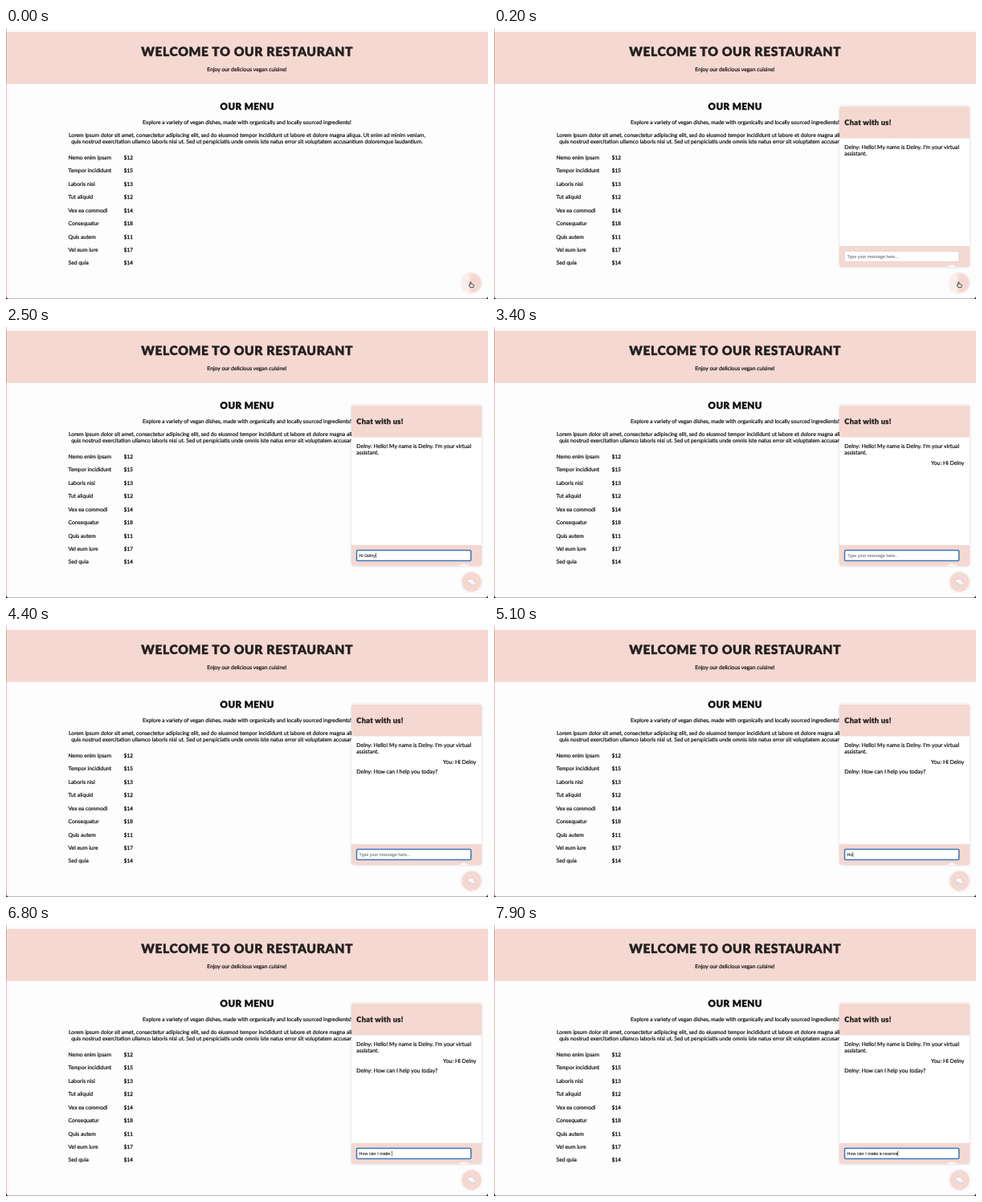
These frames come from a looping animation (600 by 338 pixels, 8 s). An HTML page:

```html
<!DOCTYPE html>
<html lang="en">
<head>
<meta charset="utf-8">
<title>Restaurant chat</title>
<style>
  html, body { margin: 0; width: 100%; height: 100%; overflow: hidden; background: #fefdfd; }
  svg { display: block; width: 100%; height: 100%; }
  text { font: 6.8px Lato, "Open Sans", sans-serif; fill: #111; stroke: #111; stroke-width: .2px;
         white-space: pre; text-rendering: geometricPrecision; }
  .title { font-weight: 900; fill: #231f1e; stroke: #231f1e; stroke-width: .4px; letter-spacing: .035em; }
  .mid { text-anchor: middle; }
  .end { text-anchor: end; }
  .chat text { font-size: 6.9px; }
  .price { font-size: 6.4px; stroke-width: .3px; }
  .chat #entry { font: 5.42px "Liberation Sans", Arial, sans-serif; stroke-width: .08px; }
  .pink { fill: #f4d8d1; }
</style>
</head>
<body>
<svg viewBox="0 0 600 338">
  <defs>
    <filter id="soft" x="-20%" y="-20%" width="140%" height="140%">
      <feDropShadow dx="0" dy="0" stdDeviation="1.5" flood-opacity=".18"/>
    </filter>
    <linearGradient id="glow">
      <stop offset=".3" stop-color="#fbefec"/>
      <stop offset=".52" stop-color="#f4d8d1"/>
    </linearGradient>
    <clipPath id="round"><rect x="430" y="97.5" width="162" height="200.5" rx="3"/></clipPath>
  </defs>

  <rect width="600" height="338" fill="#fefdfd"/>
  <rect class="pink" y="4.8" width="600" height="64.9"/>
  <text class="title mid" x="300.2" y="35" style="font-size:15.7px">WELCOME TO OUR RESTAURANT</text>
  <text class="mid" x="300" y="54.3">Enjoy our delicious vegan cuisine!</text>
  <text class="title mid" x="300.2" y="102.2" style="font-size:11.6px;fill:#0c0c0c;stroke:#0c0c0c">OUR MENU</text>
  <text class="mid" x="300" y="120.4">Explore a variety of vegan dishes, made with organically and locally sourced ingredients!</text>
  <text class="mid" x="300" y="136.2">Lorem ipsum dolor sit amet, consectetur adipiscing elit, sed do eiusmod tempor incididunt ut labore et dolore magna aliqua. Ut enim ad minim veniam,</text>
  <text class="mid" x="300" y="144.4">quis nostrud exercitation ullamco laboris nisi ut. Sed ut perspiciatis unde omnis iste natus error sit voluptatem accusantium doloremque laudantium.</text>
  <g id="menu"></g>

  <g id="panel" class="chat">
    <rect x="430" y="97.5" width="162" height="200.5" rx="3" fill="#fff" filter="url(#soft)"/>
    <g clip-path="url(#round)">
      <rect class="pink" x="430" y="97.5" width="162" height="40"/>
      <rect class="pink" x="430" y="272" width="162" height="26"/>
      <path d="M562 298.5L570 295L578 298.5Z" fill="#fdf7f5"/>
    </g>
    <text class="title" x="436.3" y="120.8" style="font-size:9.2px;stroke-width:.25px">Chat with us!</text>
    <text x="436.3" y="150.9">Delny: Hello! My name is Delny. I'm your virtual</text>
    <text x="436.3" y="159.1">assistant.</text>
    <text id="sent" class="end" x="585.3" y="171.7">You: Hi Delny</text>
    <text id="reply" x="436.3" y="183.9">Delny: How can I help you today?</text>
    <rect id="field" x="436.5" y="278.6" width="142.3" height="12.8" fill="#fff"/>
    <text id="entry" x="439.6" y="286.9"></text>
    <rect id="caret" y="281.7" width=".6" height="6.4" fill="#111"/>
  </g>

  <circle id="button" cx="579.5" cy="318" r="12" filter="url(#soft)"/>
  <g id="bubble" fill="#fff" stroke="#b9b4b5" stroke-width=".4">
    <path d="M578 317.2h4.6q1.4 0 1.4 1.4v1q0 1.4-1.4 1.4l.6 1.6l-2.2-1.6h-3z"/>
    <path d="M576.3 314.9h4.4q1.6 0 1.6 1.5v1.2q0 1.5-1.6 1.5h-3l-2.2 1.6l.5-1.9q-1.2-.3-1.2-1.3v-1q0-1.6 1.5-1.6z"/>
  </g>

  <path d="M.4 0V338" stroke="#d49c95" stroke-width=".8"/>
  <path d="M0 337.7H600" stroke="#77706f" stroke-width=".6"/>
  <path d="M0 334Q.3 337.7 4 338H0ZM600 334Q599.7 337.7 596 338H600Z" fill="#2b2626"/>

  <g id="pointer" stroke-linejoin="round">
    <path id="hand" transform="scale(.85)" d="M-1.6 .8V-3q0-.9 .8-.9t.8 .9V-.8q1-.5 1.4 .2q1-.4 1.3 .4q1-.2 1.1 .7V2q0 1-.7 2.2H-1.2L-3.4 1.2q-.1-1 .8-.9z" fill="#e8e4e4" stroke="#222" stroke-width=".9"/>
    <path id="arrow" d="M0-4V3.6L1.8 2L3 4.7L4.2 4.2L3 1.6H5.4Z" fill="#111" stroke="#fff" stroke-width=".6"/>
    <path id="beam" d="M-1.5-3.3Q0-3.3 0-2.3Q0-3.3 1.5-3.3M0-2.3V2.3M-1.5 3.3Q0 3.3 0 2.3Q0 3.3 1.5 3.3M-.7 .8H.7" fill="none" stroke="#222" stroke-width=".7"/>
  </g>
</svg>
<script>
const LOOP = 8000, OPEN = 200, FOCUS = 1100, SEND = 2900, REPLY = 3900, KEY = 131;
const MESSAGES = [
  { text: "Hi Delny", start: 1430, end: SEND },
  { text: "How can I make a reservation?", start: 4720, end: LOOP }
];
const dishes = [
  ["Nemo enim ipsam", 12], ["Tempor incididunt", 15], ["Laboris nisi", 13],
  ["Tut aliquid", 12], ["Vex ea commodi", 14], ["Consequatur", 18],
  ["Quis autem", 11], ["Vel eum iure", 17], ["Sed quia", 14]
];
const el = id => document.getElementById(id);
const show = (id, on) => el(id).style.display = on ? "" : "none";
const set = (id, attrs) => {
  for (const key in attrs) el(id).setAttribute(key, attrs[key]);
};

el("menu").innerHTML = dishes.map(([name, price], i) => {
  const y = 164 + i * 16.43;
  return `<text x="77.5" y="${y}">${name}</text><text class="price" x="146.8" y="${y}">$${price}</text>`;
}).join("");

function typed(t) {
  const message = MESSAGES.find(m => t >= m.start && t < m.end);
  return message ? message.text.slice(0, Math.floor((t - message.start) / KEY)) : "";
}

function drawPointer(t) {
  const p = Math.min(1, Math.max(0, (t - 500) / 500));
  const ease = p * p * (3 - 2 * p);
  const x = 579 - 51 * ease, y = 320 - 36 * ease;
  const onButton = Math.hypot(x - 579.5, y - 318) < 12;
  const onField = x < 578.8 && y > 278.6 && y < 291.4;
  set("pointer", { transform: `translate(${x} ${y})` });
  show("pointer", t < MESSAGES[0].start + KEY);
  show("hand", onButton);
  show("beam", onField);
  show("arrow", !onButton && !onField);
  show("bubble", !onButton);
  set("button", { fill: onButton ? "url(#glow)" : "#f4d8d1" });
}

function drawField(t) {
  const text = typed(t), focused = t >= FOCUS;
  const entry = el("entry");
  entry.textContent = text || "Type your message here...";
  entry.style.fill = entry.style.stroke = text ? "#111" : "#6c6c6c";
  const since = t - (t < SEND ? FOCUS : SEND);
  show("caret", focused && (text || Math.floor(since / 500) % 2 === 0));
  set("caret", { x: 439.7 + (text ? entry.getComputedTextLength() : 0) });
  set("field", focused
    ? { stroke: "#3a78bd", "stroke-width": 1.5, rx: 1.2 }
    : { stroke: "#dccac6", "stroke-width": .6, rx: 0 });
}

function draw(now) {
  const t = now % LOOP;
  show("panel", t >= OPEN);
  show("sent", t >= SEND);
  show("reply", t >= REPLY);
  drawPointer(t);
  if (t >= OPEN) drawField(t);
  requestAnimationFrame(draw);
}
requestAnimationFrame(draw);
</script>
</body>
</html>
```
